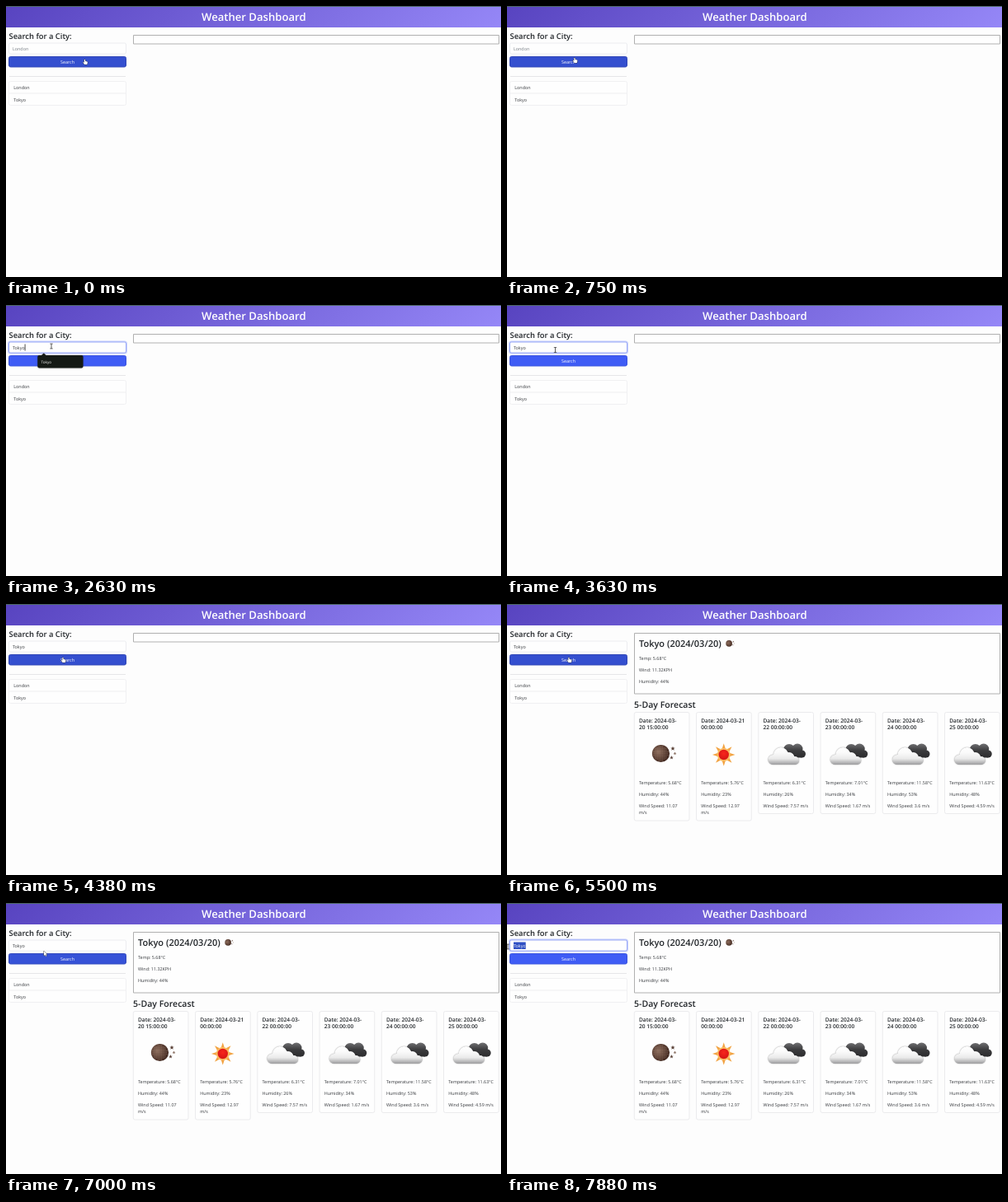
An HTML page with a canvas that plays this animation: 600x329 px, repeating every 8 s.

```html
<!DOCTYPE html>
<html lang="en">
<head>
<meta charset="utf-8">
<title>Weather Dashboard</title>
<style>
html, body { margin: 0; width: 100%; height: 100%; overflow: hidden; background: #fdfdfd; }
canvas { display: block; width: 600px; height: 329px; }
</style>
</head>
<body>
<canvas id="stage"></canvas>
<script>
const W = 600, H = 329, LOOP = 8000, STEP = 125;
const canvas = document.getElementById('stage');
const ctx = canvas.getContext('2d');
const dpr = window.devicePixelRatio || 1;
canvas.width = W * dpr;
canvas.height = H * dpr;

const INK = '#35383c', HEAD = '#212529', FRAME = '#b0b0b0';

// Pointer hot spot: time, x, y
const PATH = [
  [0, 95.5, 65], [250, 95, 65], [375, 95, 65], [750, 82, 63], [1000, 64, 55],
  [1250, 55, 50], [3375, 55, 50], [3875, 62, 59], [4250, 69, 65], [4375, 69, 65],
  [4625, 75, 65], [6375, 75, 65], [6875, 50, 62], [7000, 46, 58.5],
  [7250, 25, 52], [7375, 22, 52], [7750, 5, 53], [7875, 1, 53]
];

const DAYS = [
  ['Date: 2024-03-', '20 15:00:00', 'moon', '5.68', 44, '11.07'],
  ['Date: 2024-03-21', '00:00:00', 'sun', '5.76', 23, '12.97'],
  ['Date: 2024-03-', '22 00:00:00', 'cloud', '6.31', 26, '7.57'],
  ['Date: 2024-03-', '23 00:00:00', 'cloud', '7.01', 34, '1.67'],
  ['Date: 2024-03-', '24 00:00:00', 'cloud', '11.58', 53, '3.6'],
  ['Date: 2024-03-', '25 00:00:00', 'cloud', '11.63', 48, '4.59']
];

const clamp = v => Math.max(0, Math.min(1, v));

function pointer(t) {
  let a = PATH[0];
  for (const b of PATH) {
    if (t < b[0]) {
      const k = clamp((t - a[0]) / (b[0] - a[0]));
      return { x: a[1] + (b[1] - a[1]) * k, y: a[2] + (b[2] - a[2]) * k };
    }
    a = b;
  }
  return { x: a[1], y: a[2] };
}

function mix(a, b, k) {
  return `rgb(${a.map((v, i) => Math.round(v + (b[i] - v) * k))})`;
}

function text(s, x, y, size, color = INK, weight = 400, align = 'left') {
  ctx.font = `${weight} ${size}px "Open Sans", "Noto Sans", sans-serif`;
  ctx.textAlign = align;
  ctx.fillStyle = color;
  ctx.fillText(s, x, y);
}

function box(x, y, w, h, r, fill, stroke, line = 1) {
  ctx.beginPath();
  ctx.roundRect(x, y, w, h, r);
  if (fill) { ctx.fillStyle = fill; ctx.fill(); }
  if (stroke) { ctx.strokeStyle = stroke; ctx.lineWidth = line; ctx.stroke(); }
}

function rule(x, y, w, color) {
  ctx.fillStyle = color;
  ctx.fillRect(x, y, w, 1);
}

function disc(x, y, r, fill) {
  ctx.beginPath();
  ctx.arc(x, y, r, 0, Math.PI * 2);
  ctx.fillStyle = fill;
  ctx.fill();
}

function discs(list, fill) {
  for (const [x, y, r] of list) disc(x, y, r, fill);
}

function star(x, y, n, outer, inner, fill) {
  ctx.beginPath();
  for (let i = 0; i < n * 2; i++) {
    const r = i % 2 ? inner : outer, a = i * Math.PI / n;
    ctx.lineTo(x + r * Math.sin(a), y - r * Math.cos(a));
  }
  ctx.closePath();
  ctx.fillStyle = fill;
  ctx.fill();
}

function radial(x, y, r, inner, outer) {
  const g = ctx.createRadialGradient(x, y, 0, x, y, r);
  g.addColorStop(0, inner);
  g.addColorStop(1, outer);
  return g;
}

function vertical(y0, y1, ...colors) {
  const g = ctx.createLinearGradient(0, y0, 0, y1);
  colors.forEach((c, i) => g.addColorStop(i / (colors.length - 1), c));
  return g;
}

const icons = {
  moon() {
    disc(-1, -1, 10.6, radial(-4, -3, 14, '#8a6a5a', '#3d241c'));
    for (let row = -4; row <= 4; row++) {
      for (let col = -4; col <= 4; col++) {
        const x = col * 2.1 - 1, y = row * 2.1 - 1;
        if (Math.hypot(x + 1, y + 1) < 9) disc(x, y, 0.6, 'rgba(190,160,140,.4)');
      }
    }
    star(13.5, -7, 5, 2.8, 1.2, '#5b4238');
    star(16, -1, 5, 2, 0.9, '#8a7062');
    star(12, 4, 5, 2.4, 1, '#5b4238');
  },
  sun() {
    star(0, 0.5, 8, 13.8, 6.5, '#f2a444');
    disc(0, 0.5, 8, '#fbbd62');
    disc(0, 0.5, 6.2, radial(0, -1, 8, '#f8261c', '#d41414'));
  },
  cloud() {
    const dark = vertical(-13, 4, '#707072', '#3c3c3e', '#2c2c2e');
    discs([[4, -5.5, 7], [14, -6.5, 6.5], [19.5, -0.5, 4.5]], dark);
    ctx.fillRect(4, -5, 15.5, 9);
    ctx.shadowColor = 'rgba(0,0,0,.45)';
    ctx.shadowBlur = 1.5 * dpr;
    ctx.beginPath();
    for (const [x, y, r] of [[-15.5, 6.5, 6], [-6, 0.5, 9], [4, 4, 6.5], [11, 7.5, 5]]) {
      ctx.moveTo(x + r, y);
      ctx.arc(x, y, r, 0, Math.PI * 2);
    }
    ctx.rect(-15.5, 4, 26.5, 8.5);
    ctx.fillStyle = vertical(-9, 12.5, '#fff', '#fafafa', '#eaeaea', '#9c9c9e');
    ctx.fill();
  }
};

function icon(name, x, y, scale = 1) {
  ctx.save();
  ctx.translate(x, y);
  ctx.scale(scale, scale);
  icons[name]();
  ctx.restore();
}

function header() {
  const g = ctx.createLinearGradient(143.5, -143.5, 456.5, 169.5);
  g.addColorStop(0, '#5844c0');
  g.addColorStop(1, '#9587f7');
  ctx.fillStyle = g;
  ctx.fillRect(0, 0, W, 26);
  rule(0, 0, W, '#4b6660');
  text('Weather Dashboard', 300.3, 18, 13.1, '#fff', 600, 'center');
}

function sidebar(s) {
  text('Search for a City:', 3.5, 40.2, 9.4, HEAD, 600);
  if (s.ring > 0) {
    ctx.globalAlpha = s.ring;
    box(3.5, 45, 142, 13, 2, null, '#c5cefb', 3);
    ctx.globalAlpha = 1;
  }
  box(3.5, 45, 142, 13, 2, '#fefefe', mix([236, 237, 240], [157, 172, 248], s.ring));
  text(s.value || 'London', 8, 53.8, 5.4, s.value ? INK : '#777d84');
  if (s.selectFrom < 22.5) {
    ctx.save();
    ctx.beginPath();
    ctx.rect(s.selectFrom, 47.5, 22.7 - s.selectFrom, 8.5);
    ctx.clip();
    ctx.fillStyle = '#2f50c4';
    ctx.fillRect(0, 45, 40, 13);
    text(s.value, 8, 53.8, 5.4, '#fff');
    ctx.restore();
  }
  if (s.caret) {
    ctx.font = '400 5.4px "Open Sans", "Noto Sans", sans-serif';
    ctx.fillStyle = '#222';
    ctx.fillRect(8 + ctx.measureText(s.value).width, 47.5, 0.8, 8);
  }

  box(3.5, 61.5, 142, 12.5, 2, mix([63, 92, 245], [52, 79, 207], s.hover),
    mix([58, 84, 222], [49, 71, 182], s.hover));
  text('Search', 74.5, 69.8, 5.4, '#fff', 400, 'center');
  rule(4, 85, 141, '#e6e6e8');
  box(3.5, 91.5, 142, 29, 2, '#fefefe', '#f0f0f2');
  rule(4, 105.5, 141, '#f0f0f2');
  text('London', 9.3, 100.8, 5.4);
  text('Tokyo', 9.3, 115.5, 5.4);
}

function results() {
  box(154.5, 35.5, 443, 73.5, 0, '#fefefe', FRAME);
  text('Tokyo (2024/03/20)', 160, 52.3, 11, HEAD, 600);
  icon('moon', 269.5, 48.3, 0.36);
  text('Temp: 5.68°C', 160, 67.5, 5.4);
  text('Wind: 11.32KPH', 160, 81.6, 5.4);
  text('Humidity: 44%', 160, 95.9, 5.4);
  text('5-Day Forecast', 154, 126, 10.55, HEAD, 600);
  DAYS.forEach(([top, bottom, kind, temp, humid, wind], i) => {
    const x = 154.3 + i * 75.25, left = x + 5.7, wraps = i < 2;
    box(x, 131.5, 66.7, wraps ? 131.5 : 123, 2, '#fefefe', '#ebebed');
    text(top, left, 144, 6.6, HEAD, 600);
    text(bottom, left, 152.2, 6.6, HEAD, 600);
    icon(kind, x + 33.2, 182.5);
    text(`Temperature: ${temp}°C`, left, 218.8, 5.4);
    text(`Humidity: ${humid}%`, left, 232.9, 5.4);
    text(`Wind Speed: ${wind}${wraps ? '' : ' m/s'}`, left, 247, 5.4);
    if (wraps) text('m/s', left, 255.2, 5.4);
  });
}

function suggestions(items, alpha) {
  ctx.save();
  ctx.globalAlpha = alpha;
  ctx.shadowColor = 'rgba(0,0,0,.35)';
  ctx.shadowBlur = 2 * dpr;
  const h = items.length > 1 ? 54 : 15.5;
  ctx.beginPath();
  ctx.moveTo(42.5, 61.5);
  ctx.lineTo(45.8, 58.5);
  ctx.lineTo(49, 61.5);
  ctx.roundRect(38.3, 61, 55.2, h, 2);
  ctx.fillStyle = '#151a15';
  ctx.fill();
  ctx.shadowColor = 'transparent';
  items.forEach((s, i) => text(s, 42.6, 71 + i * 12.7, 4.6, '#f4f4f4'));
  ctx.restore();
}

function shape(points, fill, stroke) {
  ctx.beginPath();
  points.forEach(([x, y]) => ctx.lineTo(x, y));
  ctx.closePath();
  ctx.lineJoin = 'round';
  ctx.lineWidth = 1;
  ctx.strokeStyle = stroke;
  ctx.stroke();
  ctx.fillStyle = fill;
  ctx.fill();
}

function cursor(kind, p) {
  ctx.save();
  ctx.translate(p.x, p.y);
  if (kind === 'beam') {
    ctx.fillStyle = '#333';
    ctx.fillRect(-0.4, -3, 0.8, 6);
    ctx.fillRect(-1.7, -3.3, 3.4, 0.7);
    ctx.fillRect(-1.7, 2.6, 3.4, 0.7);
  } else if (kind === 'hand') {
    shape([[-0.6, 0], [0.5, 0], [0.6, 2], [3, 2.6], [3.4, 3.5], [2.8, 6], [-0.3, 6],
      [-2.2, 3.6], [-1.7, 3], [-0.7, 3.7]], '#fff', '#30354a');
  } else {
    shape([[0, 0], [0, 5.4], [1.3, 4.3], [2.2, 6.2], [3, 5.8], [2.2, 4], [3.8, 3.9]], '#fff', '#444');
  }
  ctx.restore();
}

const onButton = p => p.y >= 61.5 && p.y <= 74;
const onInput = p => p.y >= 45 && p.y <= 58;

function draw(now) {
  const t = Math.floor((now % LOOP + 1) / STEP) * STEP;
  const p = pointer(t);
  const typed = Math.max(0, Math.floor((t - 1875) / STEP));
  const state = {
    value: 'Tokyo'.slice(0, typed),
    ring: t < 4250 ? clamp((t - 1400) / 200) : clamp((t - 7275) / 200),
    caret: t >= 1500 && t < 4250 && !(t >= 3250 && t < 3750),
    hover: 0.2 * onButton(p) + 0.8 * onButton(pointer(t - STEP)),
    selectFrom: t >= 7375 ? Math.max(8, p.x) : 99
  };

  ctx.setTransform(dpr, 0, 0, dpr, 0, 0);
  ctx.textRendering = 'geometricPrecision';
  ctx.textAlign = 'left';
  ctx.fillStyle = '#fdfdfd';
  ctx.fillRect(0, 0, W, H);
  header();
  sidebar(state);
  if (t >= 4500) results();
  else box(154.5, 35.5, 443, 10.5, 0, '#fefefe', FRAME);
  if (t >= 1500 && t < 3000) {
    const items = t < 2000 ? ['pebbleman', 'London', 'Tokyo', 'adadadadd'] : ['Tokyo'];
    suggestions(items, t < 2875 ? 1 : 0.5);
  }
  cursor(onButton(p) ? 'hand' : onInput(p) || t >= 7375 ? 'beam' : 'arrow', p);
}

let start;
function tick(now) {
  if (start === undefined) start = now;
  draw(now - start);
  requestAnimationFrame(tick);
}
requestAnimationFrame(tick);
</script>
</body>
</html>
```
